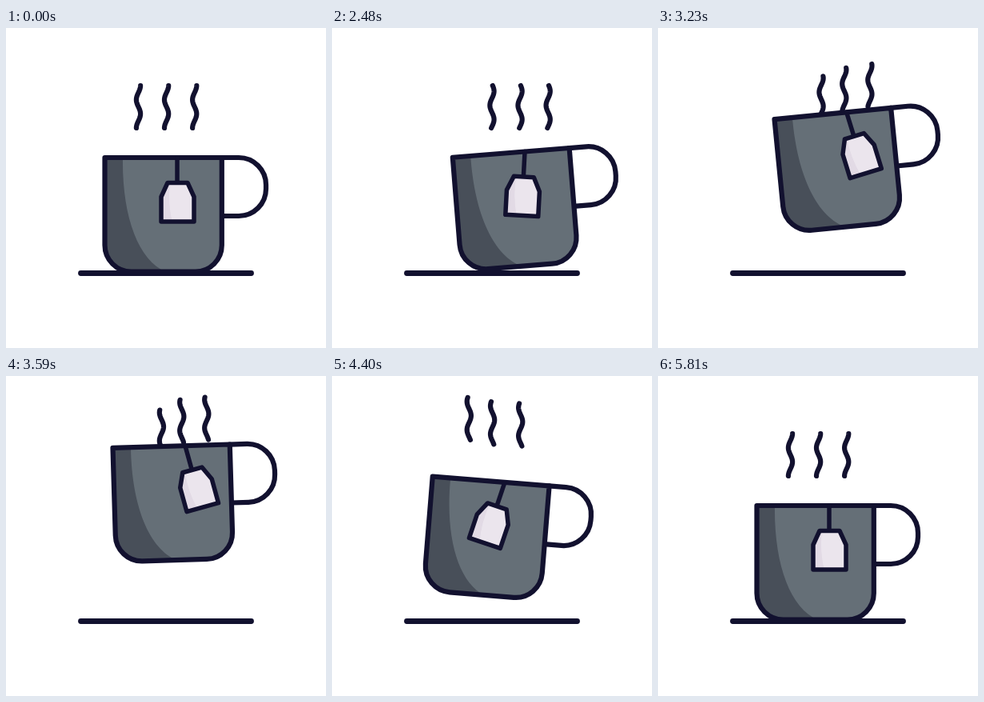
These frames come from a looping animation (400 by 400 pixels, 5.87 s). An HTML page with a canvas:

```html
<!DOCTYPE html>
<html lang="en">
<head>
<meta charset="utf-8">
<title>Hopping tea cup</title>
<style>
  html, body { margin: 0; width: 100%; height: 100%; overflow: hidden; background: #fff; }
  canvas { display: block; width: 100vw; height: 100vh; }
</style>
</head>
<body>
<canvas id="stage" width="400" height="400"></canvas>
<script>
const ctx = document.getElementById('stage').getContext('2d');
const LOOP = 5870, REST = 2030, STEP = 30;
const INK = '#12112f', CUP = '#656f77', CUP_SHADE = '#484f59';
const TAG = '#ebe5ed', TAG_SHADE = '#e2dae5';
const CENTER = { x: 196.5, y: 233 };
const HANG = { x: 214, y: 162 };

const body = new Path2D('M123.5 162H269.8V271.5A33 33 0 0 1 236.8 304.5H156.5A33 33 0 0 1 123.5 271.5Z');
const bodyShade = new Path2D('M146 162C145 235 165 290 200 305H120V162Z');
const handle = new Path2D('M269.5 162H291A34 34 0 0 1 325 196V201A34 34 0 0 1 291 235H269.5');
const tag = new Path2D('M202 193.5H227L235 211V242H194V211Z');
const tagShade = new Path2D('M205 193Q202 218 208 243H190V193Z');

// Smooth progress from 0 to 1 between two times
function ease(t, from, to) {
  const p = Math.min(1, Math.max(0, (t - from) / (to - from)));
  return p * p * (3 - 2 * p);
}

const cupX = t => 46.5 * ease(t, 2000, 2750) - 50.5 * ease(t, 2580, 4200) + 4 * ease(t, 4330, 4760);
const cupY = t => 78 * (ease(t, 3800, 4850) - ease(t, 2200, 3800));
const cupTilt = t => -6 * ease(t, 2000, 2700) + 11 * ease(t, 3100, 4250) - 5 * ease(t, 4300, 4900);

// The tag lags behind the cup, then swings out
const tagSwing = t => 8 * ease(t, 2000, 2550) - 24 * ease(t, 2650, 3450) + 30 * ease(t, 3450, 4280)
  - 23 * ease(t, 4450, 5250) + 11 * ease(t, 5250, 5580) - 2 * ease(t, 5580, 5810);

function rotateAbout(point, degrees) {
  ctx.translate(point.x, point.y);
  ctx.rotate(degrees * Math.PI / 180);
  ctx.translate(-point.x, -point.y);
}

function line(x0, y0, x1, y1) {
  ctx.beginPath();
  ctx.moveTo(x0, y0);
  ctx.lineTo(x1, y1);
  ctx.stroke();
}

function fillShaded(shape, fill, shade, shadeFill) {
  ctx.fillStyle = fill;
  ctx.fill(shape);
  ctx.save();
  ctx.clip(shape);
  ctx.fillStyle = shadeFill;
  ctx.fill(shade);
  ctx.restore();
  ctx.stroke(shape);
}

// Wisps trail the cup, the left one most; three waves run down each
function drawWisp(index, t) {
  const lag = (2 - index) ** 2;
  const away = ease(t, 2000, 2700) * (1 - ease(t, 2550 + 40 * lag, 4250 + 160 * lag));
  const lift = ease(t, 2670 + 28 * lag, 3680 + 118 * lag) - ease(t, 3980 + 70 * lag, 5470 + 32 * lag);
  const x = 165.5 + 35.1 * index + 45 * away;
  const y = 72 - 46.5 * lift;
  const phase = -6 * Math.PI * ease(t, 2000, 5060);
  const length = 53;
  ctx.beginPath();
  for (let s = 0; s <= length; s++) {
    ctx.lineTo(x + 2.6 * Math.cos(3 * Math.PI * s / length + phase), y + s);
  }
  ctx.stroke();
}

function drawCup(t) {
  ctx.save();
  ctx.translate(cupX(t), cupY(t));
  rotateAbout(CENTER, cupTilt(t));
  ctx.stroke(handle);
  fillShaded(body, CUP, bodyShade, CUP_SHADE);
  rotateAbout(HANG, tagSwing(t));
  ctx.lineWidth = 5.5;
  line(HANG.x, HANG.y, HANG.x, 193);
  fillShaded(tag, TAG, tagShade, TAG_SHADE);
  ctx.restore();
}

function draw(t) {
  ctx.fillStyle = '#fff';
  ctx.fillRect(0, 0, 400, 400);
  ctx.strokeStyle = INK;
  ctx.lineCap = ctx.lineJoin = 'round';
  ctx.lineWidth = 6.2;
  for (let i = 0; i < 3; i++) drawWisp(i, t);
  drawCup(t);
  ctx.lineWidth = 6.8;
  line(93.5, 306.5, 306.5, 306.5);
}

const began = performance.now();
function tick() {
  const t = (performance.now() - began) % LOOP;
  draw(t < REST ? 0 : REST + STEP * Math.floor((t - REST) / STEP));
  requestAnimationFrame(tick);
}
tick();
</script>
</body>
</html>
```
